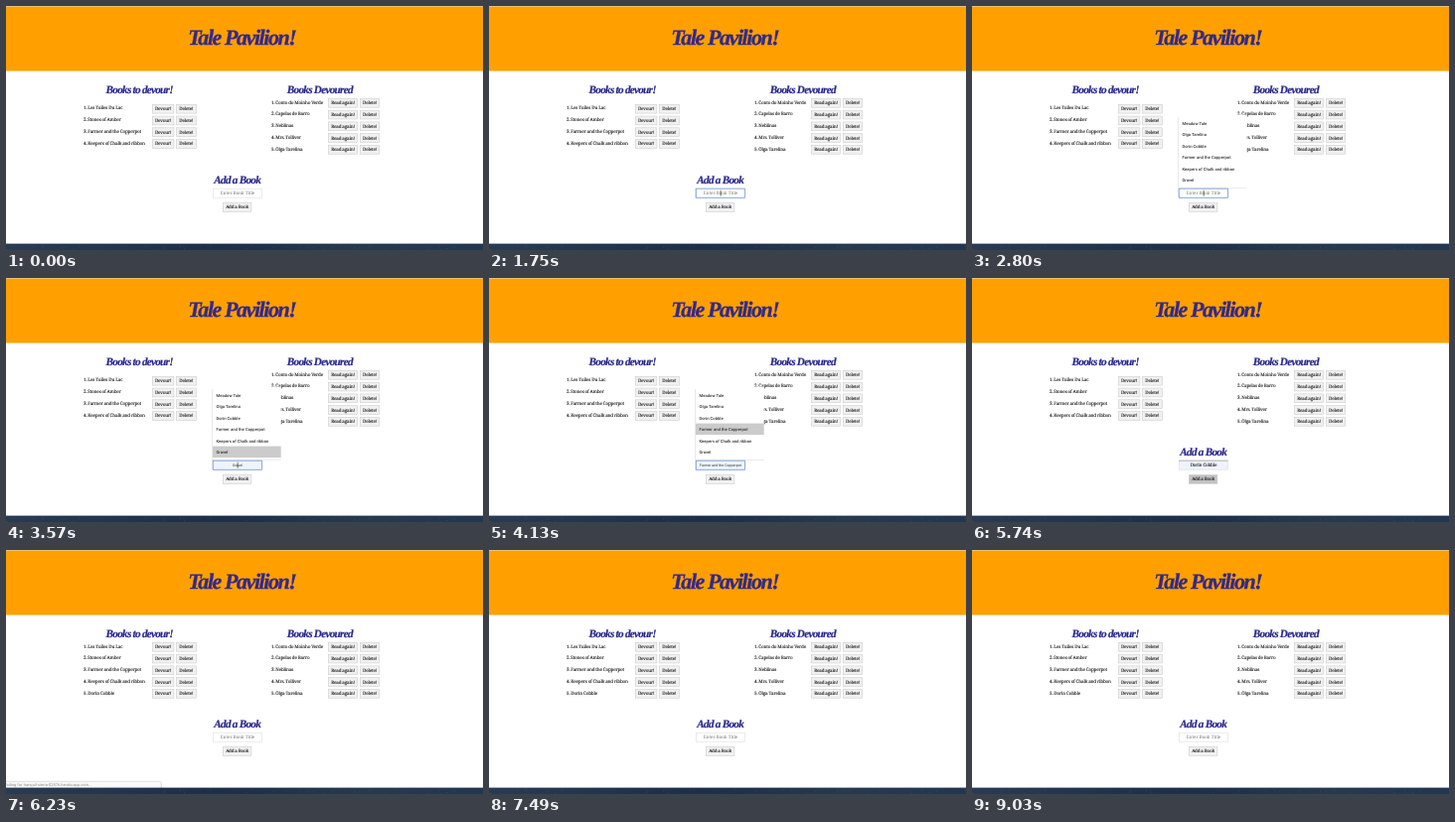
An HTML page that plays this animation: 480x246 px, repeating every 9.1 s.

```html
<!DOCTYPE html>
<html lang="en">
<head>
<meta charset="utf-8">
<title>Reading list</title>
<style>
  html, body { margin: 0; width: 100%; height: 100%; overflow: hidden; background: #fff; }
  svg { display: block; width: 100%; height: 100%; }
  text { font-family: "Noto Serif", serif; font-size: 4.6px; letter-spacing: -.04em; fill: #1c1c1c; stroke: #1c1c1c; stroke-width: .1; white-space: pre; text-rendering: geometricPrecision; }
  .head { font: italic bold 11.2px "Liberation Serif", "Times New Roman", serif; letter-spacing: -.065em; fill: #29278c; stroke: #29278c; stroke-width: .2; text-anchor: middle; }
  .title { font-size: 22px; fill: #35288a; stroke: #35288a; stroke-width: .35; }
  .label { font-size: 4.6px; text-anchor: middle; }
  .option { font: 500 4.2px Roboto, sans-serif; letter-spacing: 0; fill: #333; stroke: none; }
  .field { text-anchor: middle; }
  .hint { fill: #777; stroke: none; letter-spacing: 0; font-size: 4.5px; }
  .preview { font: 3.6px Roboto, sans-serif; letter-spacing: 0; fill: #333; stroke: none; }
  .status { font: 4px Roboto, sans-serif; letter-spacing: 0; fill: #8a8a8a; stroke: none; }
</style>
</head>
<body>
<svg id="stage" viewBox="0 0 480 246" xmlns="http://www.w3.org/2000/svg"></svg>
<script>
const LOOP = 9100;
const ROW = 11.75;
const OPTION = 11.5;
const stage = document.getElementById("stage");

const toRead = ["Les Tuiles Du Lac", "Stones of Amber", "Farmer and the Copperpot", "Keepers of Chalk and ribbon", "Dorin Cobble"];
const finished = ["Conto do Moinho Verde", "Capelas de Barro", "Neblinas", "Mrs. Tolliver", "Olga Tarelina"];
const options = ["Meadow Tale", "Olga Tarelina", "Dorin Cobble", "Farmer and the Copperpot", "Keepers of Chalk and ribbon", "Gravel"];

function add(parent, tag, attrs = {}, content = "") {
  const el = document.createElementNS("http://www.w3.org/2000/svg", tag);
  for (const key in attrs) el.setAttribute(key, attrs[key]);
  el.textContent = content;
  parent.appendChild(el);
  return el;
}
const group = parent => add(parent, "g");
const rect = (parent, x, y, width, height, fill, more) =>
  add(parent, "rect", { x, y, width, height, fill, ...more });
const text = (parent, x, y, content, cls = "") =>
  add(parent, "text", { x, y, class: cls }, content);

function button(parent, x, y, width, label) {
  const box = rect(parent, x, y - 4.4, width, 8.8, "#f1f1f1", { stroke: "#cdcdcd", "stroke-width": .6 });
  text(parent, x + width / 2, y + 1.5, label, "label");
  return box;
}

function bookRow(parent, x, y, label, buttons) {
  text(parent, x, y + 1.5, label);
  for (const [bx, width, name] of buttons) button(parent, bx, y + .8, width, name);
}

// Page
rect(stage, 0, 0, 480, 246, "#fff");
rect(stage, 0, 0, 480, 1, "#e4e4e4");
rect(stage, 0, .5, 480, 65, "#ffa000");
text(stage, 237.4, 38.5, "Tale Pavilion!", "head title");
text(stage, 134.2, 88.3, "Books to devour!", "head");
text(stage, 315.8, 88.3, "Books Devoured", "head");
text(stage, 232.7, 179.3, "Add a Book", "head");

const leftList = group(stage);
const leftRows = toRead.map((name, i) => {
  const row = group(leftList);
  bookRow(row, 78, 97 + i * ROW, `${i + 1}. ${name}`, [[147.3, 21.6, "Devour!"], [171.3, 20, "Delete!"]]);
  return row;
});
finished.forEach((name, i) =>
  bookRow(stage, 267, 97 + i * ROW, `${i + 1}. ${name}`, [[324.3, 29.4, "Read again!"], [356.3, 19.4, "Delete!"]]));

// Night sky strip
const sky = add(add(stage, "defs"), "linearGradient", { id: "sky", gradientUnits: "userSpaceOnUse", x1: 0, x2: 480 });
[["0", "#293b52"], [".45", "#1d2f48"], [".75", "#26394f"], ["1", "#223650"]].forEach(([offset, color]) =>
  add(sky, "stop", { offset, "stop-color": color }));
rect(stage, 0, 239.6, 480, 6.4, "url(#sky)");
let seed = 7;
const random = () => (seed = seed * 16807 % 2147483647) / 2147483647;
for (let i = 0; i < 60; i++)
  rect(stage, random() * 480, 240.5 + random() * 5, .7, .7, "#7187a0", { opacity: .3 });

const addButton = button(stage, 218.3, 202.9, 28.6, "Add a Book");

// Suggestions
const menu = group(stage);
rect(menu, 207.5, 109.5, 69.2, 74, "#fff");
const marker = rect(menu, 208, 0, 68.7, OPTION, "#cbcbcb");
options.forEach((name, i) => text(menu, 211.5, 119.5 + i * OPTION, name, "option"));
add(menu, "path", { d: "M207.5 112V183.4H276.7", fill: "none", stroke: "#dadada", "stroke-width": .6 });

// Input
const ring = rect(stage, 208, 184, 49.6, 9.4, "none", { rx: .8, stroke: "#bccfee", "stroke-width": 1.2 });
const field = rect(stage, 208.4, 184.2, 49, 9, "#fff", { "stroke-width": .6 });
const shade = rect(stage, 208, 183.7, 49.6, .8, "#a5a5a5");
const value = text(stage, 233, 190.1, "", "field");
const caret = rect(stage, 0, 185.7, .6, 6, "#222");

// Browser status
const status = group(stage);
rect(status, -4, 233.3, 160.3, 10, "#fafafa", { rx: 2, stroke: "#cccccc", "stroke-width": .6 });
text(status, -3, 237.8, "Waiting for tranquil-sierra-02876.herokuapp.com...", "status");
rect(status, 0, 239.6, 157, 6.4, "url(#sky)");

const within = (t, from, to) => t >= from && t < to;
const ramp = (t, from, to) => Math.min(1, Math.max(0, (t - from) / (to - from)));
const show = (el, on) => el.setAttribute("visibility", on ? "visible" : "hidden");
const paint = (el, attrs) => { for (const key in attrs) el.setAttribute(key, attrs[key]); };

function picked(t) {
  if (!within(t, 3570, 4830)) return -1;
  return t < 3710 ? 5 : t < 3850 ? 4 : t < 4270 ? 3 : 2;
}

function update(t) {
  const saved = t >= 6230;
  const focused = within(t, 1610, 5740);
  const chosen = within(t, 4620, 6230);
  const choice = picked(t);
  const filled = choice >= 0 || chosen;

  leftList.setAttribute("transform", `translate(0 ${saved ? 0 : 5.9})`);
  show(leftRows[4], saved);

  menu.setAttribute("opacity", ramp(t, 2030, 2240) * (1 - ramp(t, 4550, 4830)));
  marker.setAttribute("y", 112.1 + choice * OPTION);
  marker.setAttribute("opacity", choice < 0 ? 0 : 1);

  show(ring, focused);
  paint(field, { fill: filled ? "#eef3fe" : "#fff", stroke: focused ? "#6c8fc8" : "#dedede" });
  show(shade, chosen && !focused);

  const content = chosen ? options[2] : choice >= 0 ? options[choice] : "Enter Book Title";
  if (value.textContent !== content) value.textContent = content;
  value.setAttribute("class", "field " + (chosen ? "" : filled ? "preview" : "hint"));

  show(caret, within(t, 1610, 2240) || within(t, 2800, 3360) || within(t, 3570, 4130) || within(t, 4620, 5250));
  caret.setAttribute("x", chosen ? 246.2 : 232.8);

  addButton.setAttribute("fill", within(t, 5740, 5880) ? "#c2c2c2" : "#f1f1f1");
  status.setAttribute("opacity", t < 6090 ? 0 : 1 - ramp(t, 6370, 6720));
}

const start = performance.now();
function frame() {
  update((performance.now() - start) % LOOP);
  requestAnimationFrame(frame);
}
update(0);
requestAnimationFrame(frame);
</script>
</body>
</html>
```
